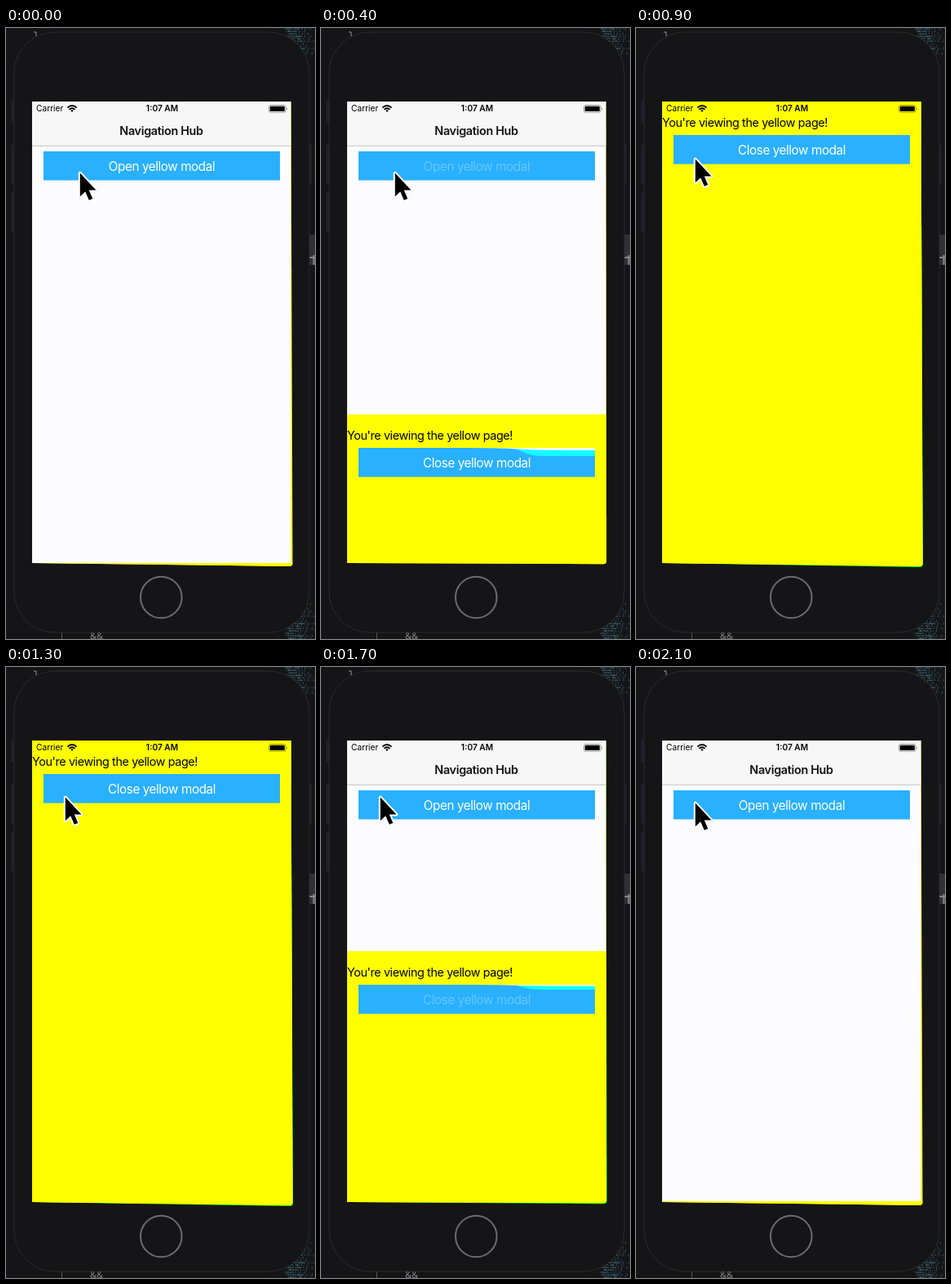
An HTML page that plays this animation: 379 by 748 pixels, repeating every 2.2 s.

```html
<!DOCTYPE html>
<html lang="en">
<head>
<meta charset="utf-8">
<title>Yellow modal</title>
<style>
  html, body { margin: 0; width: 100%; height: 100%; overflow: hidden; background: #151518; }
  svg { display: block; width: 379px; height: 748px; }
  text { font-family: Inter, Roboto, sans-serif; }
  .label { font-size: 15.26px; letter-spacing: -.42px; fill: #fff; text-anchor: middle; }
  .title { font-size: 14.4px; font-weight: 600; letter-spacing: -.33px; fill: #111; text-anchor: middle; }
  .body { font-size: 14.4px; letter-spacing: -.4px; }
  .status { font-size: 10.2px; }
  .code { font: 3px "DejaVu Sans Mono", monospace; fill: #62b4c4; }
  .scrap { font: 11px "Noto Sans", sans-serif; fill: #888; }
</style>
</head>
<body>
<svg viewBox="0 0 379 748">
  <defs>
    <clipPath id="screen"><path id="screenShape"/></clipPath>
  </defs>

  <!-- desktop behind the device -->
  <rect width="379" height="748" fill="#151518"/>
  <g id="code"></g>
  <path d="M34 5H37V10" fill="none" stroke="#999"/>
  <path d="M68.5 740V748" stroke="#555"/>
  <text class="scrap" x="103" y="748">&amp;&amp;</text>
  <rect x="371" y="253" width="8" height="37" fill="#303039"/>
  <path d="M371 281H379M377.5 278V290" stroke="#888" stroke-width="2"/>

  <!-- device -->
  <g fill="#20202b">
    <rect x="6" y="88" width="4" height="29"/>
    <rect x="6" y="143" width="4" height="49"/>
    <rect x="6" y="201" width="4" height="49"/>
    <rect x="371" y="143" width="4" height="49"/>
  </g>
  <rect x="10" y="5" width="362" height="735" rx="50" fill="#151518" stroke="#2b2b26"/>
  <circle cx="190.3" cy="697" r="25.3" fill="none" stroke="#6d6b6d" stroke-width="2"/>

  <path id="rim" fill="#0f0"/>
  <g clip-path="url(#screen)">
    <rect x="32" y="90" width="320" height="570" fill="#ff0"/>
    <path d="M32 90H349.5V655H32Z" fill="#fcfcff"/>
    <rect x="32" y="90" width="317.5" height="54" fill="#f7f7f7"/>
    <path d="M32 144.3H349.5" stroke="#b8b8b8" stroke-width=".8"/>
    <text class="title" x="190.5" y="131">Navigation Hub</text>
    <rect x="46" y="151" width="290" height="35.5" fill="#29b0ff"/>
    <text id="openLabel" class="label" x="191" y="174.5">Open yellow modal</text>

    <g id="modal">
      <rect x="32" width="320" height="570" fill="#ff0"/>
      <text class="body" x="32" y="30.5">You're viewing the yellow page!</text>
      <rect x="46" y="41" width="290" height="35.6" fill="#29b0ff"/>
      <g id="glint">
        <path d="M140 0H290V3H210Q190 0 140 0Z" fill="#fff"/>
        <path d="M189 1Q199 3 290 3V10H225C205 10 202 3 189 1Z" fill="#1ff"/>
      </g>
      <text id="closeLabel" class="label" x="191" y="64.5">Close yellow modal</text>
    </g>
  </g>

  <!-- status bar -->
  <text class="status" x="37" y="102.3">Carrier</text>
  <g fill="none" stroke="#000" stroke-width="1.9">
    <path d="M75.4 97.6Q81 92.4 86.6 97.6M77.5 99.9Q81 96.7 84.5 99.9"/>
    <path d="M79.3 101L81 103L82.7 101Q81 99.6 79.3 101Z" fill="#000" stroke="none"/>
  </g>
  <text class="status" x="191.5" y="102.3" font-weight="600" text-anchor="middle">1:07 AM</text>
  <rect x="322.5" y="94.5" width="20.5" height="8.8" rx="2.2" fill="none" stroke="#000" stroke-opacity=".45" stroke-width=".8"/>
  <rect x="323.7" y="95.7" width="18.1" height="6.4" rx="1.2"/>
  <path d="M344 97.4Q345.6 98.8 344 100.4Z" fill="#555"/>

  <g id="cursor">
    <path d="M1 4V31L8 25L12 36L17 34L12 24H20Z" opacity=".15" stroke="#000" stroke-width="3"/>
    <path d="M.8 2.6V31.2L7.2 25.2L11.8 35.8L16.3 33.9L11.8 23.5H20.5Z" stroke="#fff" stroke-width="4" stroke-linejoin="round" paint-order="stroke"/>
  </g>
</svg>
<script>
const LOOP = 2200, STEP = 100;
const SCREEN_TOP = 90, SCREEN_BOTTOM = 655;
const OPEN_AT = 335.6, CLOSE_AT = 1614.2;
const $ = id => document.getElementById(id);

// [time, x, y] of the pointer tip
const pointerPath = [
  [0, 90, 175], [500, 90, 175], [700, 86, 211], [900, 72, 158],
  [1300, 72, 157], [1900, 72, 157], [2100, 72, 164], [2200, 90, 175]
];

function pointerAt(t) {
  const i = pointerPath.findIndex(p => p[0] > t);
  const [t0, x0, y0] = pointerPath[i - 1], [t1, x1, y1] = pointerPath[i];
  const k = (t - t0) / (t1 - t0);
  return [x0 + (x1 - x0) * k, y0 + (y1 - y0) * k];
}

// Critically damped spring from 0 to 1
function spring(ms) {
  const x = Math.max(0, ms) * 0.018;
  return 1 - (1 + x) * Math.exp(-x);
}

// Screen outline whose lower right corner bulges by `spill` pixels
function outline(spill) {
  const right = 349.5 + spill / 2, bottom = SCREEN_BOTTOM + spill;
  return `M32 90H349.5L${right} ${bottom - 4}Q${right} ${bottom} ${right - 4} ${bottom}L32 655Z`;
}

function addCode(x, y, rows) {
  const words = ["const view =", "return (", "import nav", "  <Button", "  title={page}"];
  for (let i = 0; i < rows; i++) {
    const line = document.createElementNS("http://www.w3.org/2000/svg", "text");
    line.setAttribute("class", "code");
    line.setAttribute("x", x + (i * 7 % 3) * 2);
    line.setAttribute("y", y + i * 3);
    line.textContent = words[i * 3 % words.length] + " {...}";
    $("code").append(line);
  }
}

function draw(t) {
  const closing = t >= CLOSE_AT;
  const shown = closing ? 1 - spring(t - CLOSE_AT) : spring(t - OPEN_AT);
  const moving = shown > 0.05 && shown < 0.9;
  const top = Math.round(SCREEN_BOTTOM - (SCREEN_BOTTOM - SCREEN_TOP) * shown);
  const spill = moving ? 1.2 : 4;

  $("modal").setAttribute("transform", `translate(0 ${top})`);
  $("glint").setAttribute("transform", `translate(46 41) scale(1 ${closing ? 0.6 : 1})`);
  $("glint").style.display = moving ? "" : "none";
  $("screenShape").setAttribute("d", outline(spill));
  $("rim").setAttribute("d", outline(spill + 1));
  $("rim").style.display = t >= 600 && t < 1900 ? "" : "none";
  $("openLabel").setAttribute("opacity", t >= 200 && t < 600 ? 0.28 : 1);
  $("closeLabel").setAttribute("opacity", t >= 1500 ? 0.28 : 1);
  $("cursor").setAttribute("transform", `translate(${pointerAt(t)})`);
}

function tick() {
  draw(Math.floor(performance.now() % LOOP / STEP) * STEP);
  requestAnimationFrame(tick);
}

addCode(342, 2, 11);
addCode(342, 706, 15);
tick();
</script>
</body>
</html>
```
